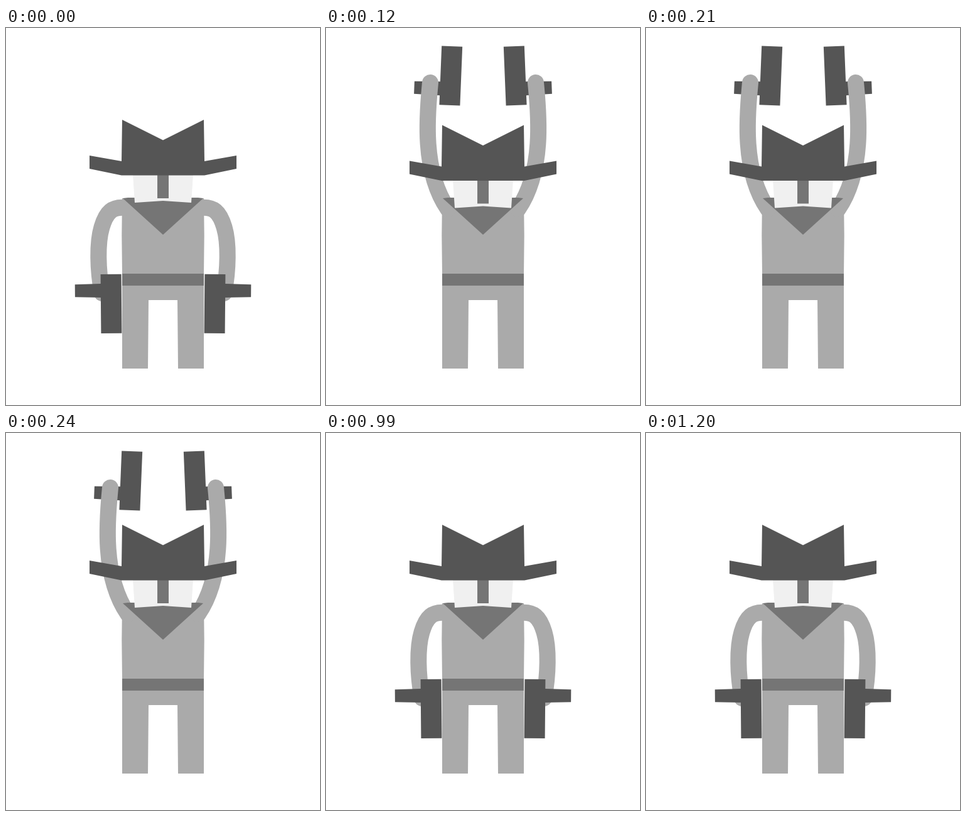
An HTML page with a canvas for the animation above (1.5 s loop, 500x600 px).

```html
<!DOCTYPE html>
<html lang="en">
<head>
<meta charset="utf-8">
<title>Gunslinger</title>
<style>
  html, body { margin: 0; height: 100%; overflow: hidden; background: #fff; }
  canvas { display: block; }
</style>
</head>
<body>
<canvas id="stage" width="500" height="600"></canvas>
<script>
const ctx = document.getElementById('stage').getContext('2d');
const LOOP = 1500, DUCK = 8.5;
const DARK = '#555', MID = '#757575', BODY = '#aaa', FACE = '#f0f0f0';

const shape = d => new Path2D(d);
const torso = shape('M185 271H315L315.7 330 315 391V542H274L273 433H227L226 542H185V391L184.3 330Z');
const belt = shape('M185 391H315V410H185Z');
const scarf = shape('M186 271L194 270H306L314 271 250 329Z');
const face = shape('M202 233H298L295 278 250 275 205 278Z');
const nose = shape('M241 233H259V271H241Z');
const hat = shape('M185 146L250 178.5 315 146 316 212 367 203V224L316 234.5H184L133 224V203L184 212Z');
// Gun with its muzzle up and grip to the left, centred on the barrel
const gun = shape('M-16.5 -47H16.5V47H-16.5V32L-57.5 31V11L-16.5 10Z');

// Left arm and gun; the right side is a mirror image.
// Raised hands lie over the grip, lowered ones behind it.
const poses = {
  low: { arm: 'M153 422C146 385 145 342 152.5 317S170 284 190 286', gun: [167.5, 438.8, -0.5], flip: -1 },
  lift: { arm: 'M145 390C138 350 136 325 150 302S172 276 192 288', gun: [166.5, 406, -2.7], flip: -1 },
  aim: { arm: 'M148 366L194 291.5', gun: [130.7, 329.4, -85.8], flip: 1 },
  up: { arm: 'M166 87C162 130 151 225 194 288', gun: [198.8, 76, 2.3], flip: 1, raised: true },
  wide: { arm: 'M128 89C136 150 156 240 194 288', gun: [164.1, 81.5, -13.3], flip: 1, raised: true }
};
for (const p of Object.values(poses)) p.arm = shape(p.arm);

// [start in ms, pose, head ducked]
const steps = [
  [0, 'low', 0], [30, 'lift', 0], [60, 'wide', 1], [120, 'up', 1],
  [180, 'wide', 1], [210, 'up', 1], [240, 'up', 0],
  [960, 'aim', 0], [990, 'low', 0], [1080, 'lift', 0], [1200, 'low', 0]
];

function fill(path, color) {
  ctx.fillStyle = color;
  ctx.fill(path);
}

function drawArm(pose) {
  ctx.strokeStyle = BODY;
  ctx.lineWidth = 26;
  ctx.lineCap = 'round';
  ctx.stroke(pose.arm);
}

function drawGun({ gun: [x, y, angle], flip }) {
  ctx.save();
  ctx.translate(x, y);
  ctx.rotate(angle * Math.PI / 180);
  ctx.scale(1, flip);
  fill(gun, DARK);
  ctx.restore();
}

function drawSide(pose) {
  if (pose.raised) {
    drawGun(pose);
    drawArm(pose);
  } else {
    drawArm(pose);
    drawGun(pose);
  }
}

function drawHead(dy) {
  ctx.save();
  ctx.translate(0, dy);
  fill(face, FACE);
  fill(nose, MID);
  fill(hat, DARK);
  ctx.restore();
}

function frame(now) {
  const t = now % LOOP;
  const [, name, ducked] = steps.findLast(([start]) => start <= t) || steps[0];
  const pose = poses[name];

  ctx.clearRect(0, 0, 500, 600);
  fill(torso, BODY);
  fill(belt, MID);
  drawSide(pose);
  ctx.save();
  ctx.translate(500, 0);
  ctx.scale(-1, 1);
  drawSide(pose);
  ctx.restore();
  fill(scarf, MID);
  drawHead(ducked * DUCK);
  requestAnimationFrame(frame);
}
frame(performance.now());
</script>
</body>
</html>
```
